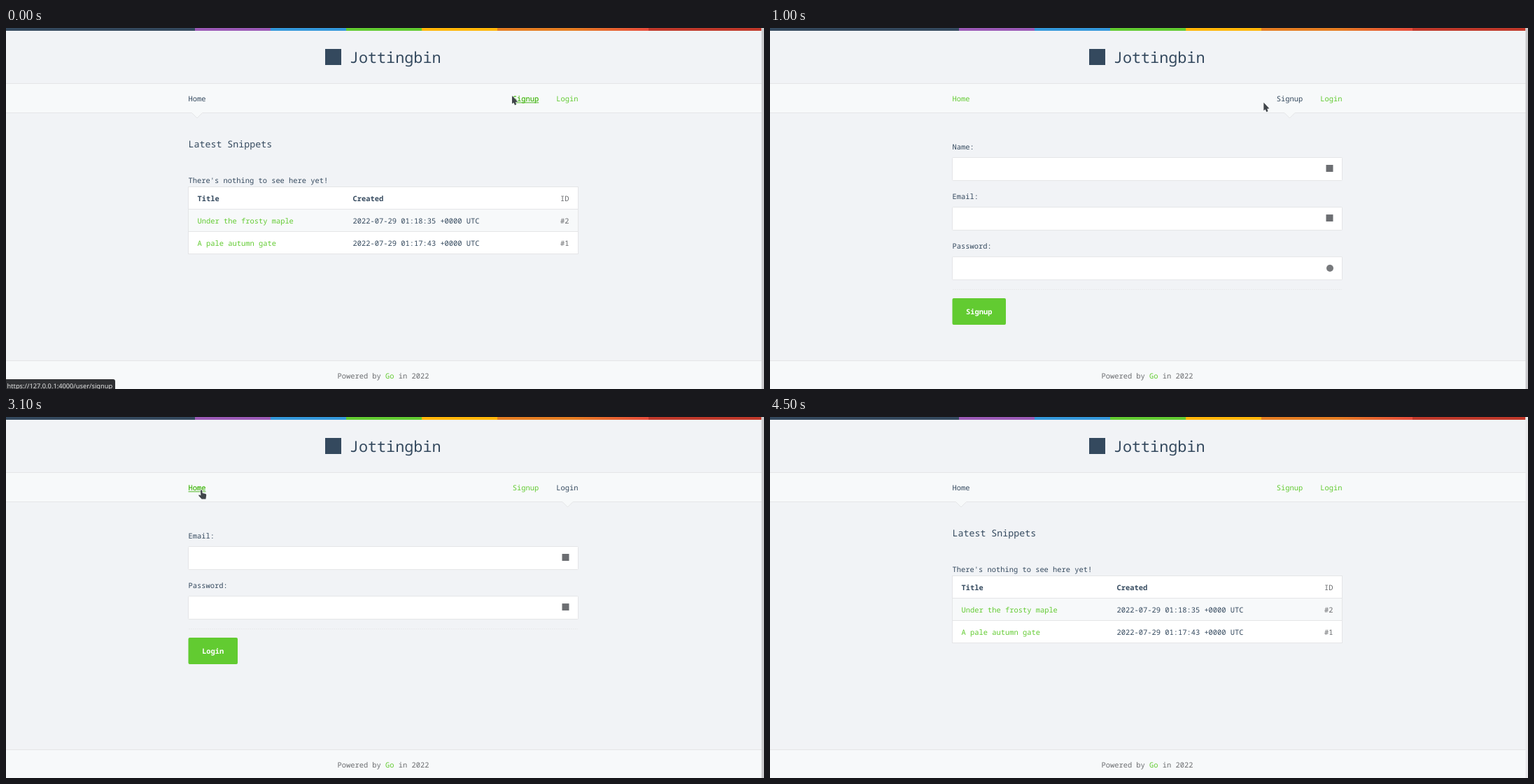
Animation of 1083 by 517 pixels, one loop 4900 ms. Source, as an HTML page:

```html
<!DOCTYPE html>
<html lang="en">
<head>
<meta charset="utf-8">
<title>Jottingbin</title>
<style>
  html, body { margin: 0; width: 100%; height: 100%; overflow: hidden; background: #f1f3f6; }
  svg { display: block; }
  text {
    font: 10.42px "Noto Sans Mono", "DejaVu Sans Mono", monospace;
    fill: #34495e; text-rendering: geometricPrecision; white-space: pre;
  }
  .link { fill: #62cb31; }
  .hover { fill: #4eb722; }
  .grey { fill: #6a6c6f; }
  .bold { font-weight: 600; }
  .light { fill: #fff; }
  .end { text-anchor: end; }
  .mid { text-anchor: middle; }
  .brand { font-size: 21.8px; font-weight: 500; }
  .h2 { font-size: 13.3px; font-weight: 500; }
  .tip { font: 9.28px "Noto Sans", "Open Sans", sans-serif; fill: #e4e4e4; }
  .pale { fill: #f7f9fa; }
  .line { stroke: #e4e5e7; fill: none; }
  .box { stroke: #e4e5e7; fill: #fff; }
  .cursor { fill: #40454a; stroke: #f4f5f6; stroke-width: .8; stroke-linejoin: round; paint-order: stroke; }
</style>
</head>
<body>
<svg id="stage" width="1083" height="517" viewBox="0 0 1083 517"></svg>
<script>
const LOOP = 4900, STEP = 100;
const HOST = 'https://127.0.0.1:4000';
const NAV = {
  home:   { label: 'Home',   x: 260.5, mid: 273 },
  signup: { label: 'Signup', x: 723.7, mid: 742.5 },
  login:  { label: 'Login',  x: 786.2, mid: 802.5 }
};

const text = (x, y, s, cls = '') => `<text x="${x}" y="${y}" class="${cls}">${s}</text>`;
const rect = (x, y, w, h, attrs) => `<rect x="${x}" y="${y}" width="${w}" height="${h}" ${attrs}/>`;
const rule = (y, x1 = 0, x2 = 1080) => `<path class="line" d="M${x1} ${y}H${x2}"/>`;

// Colour bands along the top edge: [colour, from %, to %]
const bands = [
  ['#34495e', 0, 25], ['#9b59b6', 25, 35], ['#3498db', 35, 45], ['#62cb31', 45, 55],
  ['#ffb606', 55, 65], ['#e67e22', 65, 75], ['#e74c3c', 85, 85], ['#c0392b', 85, 100]
];
const stops = bands.map(([c, a, b]) =>
  `<stop offset="${a}%" stop-color="${c}"/><stop offset="${b}%" stop-color="${c}"/>`).join('');

function frameParts() {
  return `<defs><linearGradient id="bands">${stops}</linearGradient></defs>` +
    rect(0, 0, 1083, 517, 'fill="#f1f3f6"') +
    rect(0, 0, 1079.5, 4, 'fill="url(#bands)"') +
    rect(456, 30, 23, 23, 'fill="#34495e"') +
    text(490.8, 50, 'Jottingbin', 'brand') +
    rect(0, 80, 1080, 41, 'class="pale"') + rule(79.5) + rule(121.5) +
    rect(0, 477, 1080, 40, 'class="pale"') + rule(476.5) +
    text(539, 502, 'Powered by <tspan class="link">Go</tspan> in 2022', 'grey mid');
}

function nav(page) {
  const { mid } = NAV[page];
  const notch = `<path class="pale" d="M${mid - 8} 121l8 8 8-8z"/>` +
    `<path class="line" d="M${mid - 7.5} 121.5l7.5 7.5 7.5-7.5"/>`;
  return notch + Object.entries(NAV).map(([key, n]) =>
    text(n.x, 105, n.label, key === page ? '' : 'link')).join('');
}

function homePage() {
  const row = (y, title, date, id) =>
    text(273.5, y, title, 'link') + text(495.5, y, date) + text(804.5, y, id, 'grey end');
  return text(260.5, 171, 'Latest Snippets', 'h2') +
    text(260.5, 222, "There's nothing to see here yet!") +
    rect(260.5, 227.5, 557, 96, 'class="box"') +
    rect(261, 260, 556, 31.5, 'class="pale"') +
    rule(259.5, 261, 817) + rule(291.5, 261, 817) +
    text(273.5, 247.5, 'Title', 'bold') + text(495.5, 247.5, 'Created', 'bold') +
    text(804.5, 247.5, 'ID', 'grey end') +
    row(279.5, 'Under the frosty maple', '2022-07-29 01:18:35 +0000 UTC', '#2') +
    row(311.5, 'A pale autumn gate', '2022-07-29 01:17:43 +0000 UTC', '#1');
}

function formPage(labels, action, width, roundLast) {
  const fields = labels.map((label, i) => {
    const y = 185.5 + i * 71.1;
    const mark = roundLast && i === labels.length - 1
      ? `<circle cx="800" cy="${y + 16.3}" r="5" fill="#77797c"/>`
      : rect(794.5, y + 10.5, 10, 10, 'fill="#6c6e72"');
    return text(260.5, y - 11.5, label + ':') +
      rect(260.5, y, 557, 33, 'rx="1" class="box"') + mark;
  }).join('');
  const end = 161 + labels.length * 71;
  return fields +
    `<path class="line" stroke-dasharray="2 1" opacity=".6" d="M261 ${end + .5}H817"/>` +
    rect(260.5, end + 13, width, 38, 'rx="2" fill="#62cb31"') +
    text(260.5 + width / 2, end + 36, action, 'bold light mid');
}

const pages = {
  home: homePage(),
  signup: formPage(['Name', 'Email', 'Password'], 'Signup', 76.5, true),
  login: formPage(['Email', 'Password'], 'Login', 70.5, false)
};

const hovers = Object.entries(NAV).map(([key, n]) =>
  `<g id="hover-${key}">${text(n.x, 105, n.label, 'hover')}` +
  `<path stroke="#4eb722" d="M${n.x} 106.9h${n.label.length * 6.25}"/></g>`).join('');

document.getElementById('stage').innerHTML = frameParts() +
  Object.keys(pages).map(p => `<g id="page-${p}">${nav(p)}${pages[p]}</g>`).join('') +
  hovers +
  `<g id="tip"><path id="tipBox" fill="#2f3033"/>${text(1.5, 515.5, '', 'tip')}</g>` +
  rect(1079.5, 0, 3.5, 517, 'id="bar"') +
  `<g id="cursor">
    <path id="arrow" class="cursor" d="M0 0V11.5L2.4 9.8 4 13.6 6.2 12.6 4.9 9.2 8 8.6Z"/>
    <path id="hand" class="cursor" d="M3 1.2Q4 -.3 5.2 1.2L5.6 5 10 6Q11.4 6.5 11.2 8L10.4 13.5H4.6L.3 8.8Q0 7.3 1.4 7.5L3.3 8.6Z"/>
  </g>`;

// Each track holds [start ms, value]; a value stays until the next one.
const tracks = {
  page:  [[0, 'home'], [800, 'signup'], [3100, 'login'], [3900, 'home']],
  hover: [[0, 'signup'], [800, ''], [1700, 'login'], [3100, 'home'], [3900, '']],
  shape: [[0, 'arrow'], [100, 'hand'], [800, 'arrow'], [1700, 'hand'], [3900, 'arrow'], [4400, '']],
  url:   [[0, '/user/signup'], [2000, '/user/login'], [3100, '']],
  tip:   [[0, 1], [400, .6], [500, .3], [600, 0], [2000, .35], [2100, .7], [2200, 1],
          [3100, 0], [3200, 1], [3900, .15], [4200, 0]],
  bar:   [[0, '#c9c9cb'], [4400, '#d9d9db'], [4500, '#e9e9eb']]
};
const tipWidth = { '/user/signup': 156, '/user/login': 147.5, '': 99.5 };

// Cursor path: [ms, x, y], straight between points.
const path = [
  [0, 723, 97], [100, 733, 96], [800, 733, 96], [1400, 650, 128], [1600, 757, 100],
  [1800, 788, 98], [2000, 785, 100], [2200, 784, 101], [3000, 784, 101], [3100, 275, 104],
  [3800, 275, 104], [3900, 279, 105], [4000, 85, 18], [4200, 20, 5], [4900, 20, 5]
];

const held = (track, t) => track.filter(k => k[0] <= t).pop()[1];

function cursorAt(t) {
  const i = path.findIndex(p => p[0] > t);
  const [a, b] = [path[i - 1], path[i]];
  const u = (t - a[0]) / (b[0] - a[0]);
  return [a[1] + (b[1] - a[1]) * u, a[2] + (b[2] - a[2]) * u];
}

const el = id => document.getElementById(id);
const show = (id, on) => el(id).setAttribute('visibility', on ? 'visible' : 'hidden');

function draw(t) {
  const now = {};
  for (const k in tracks) now[k] = held(tracks[k], t);
  for (const k in NAV) {
    show('page-' + k, now.page === k);
    show('hover-' + k, now.hover === k);
  }
  show('arrow', now.shape === 'arrow');
  show('hand', now.shape === 'hand');
  el('cursor').setAttribute('transform', `translate(${cursorAt(t)})`);
  el('tip').setAttribute('opacity', now.tip);
  el('tip').lastChild.textContent = HOST + now.url;
  el('tipBox').setAttribute('d', `M0 503H${tipWidth[now.url] - 3}q3 0 3 3V517H0Z`);
  el('bar').setAttribute('fill', now.bar);
}

const start = performance.now();
function tick() {
  const t = (performance.now() - start) % LOOP;
  draw(Math.floor(t / STEP) * STEP);
  requestAnimationFrame(tick);
}
tick();
</script>
</body>
</html>
```
